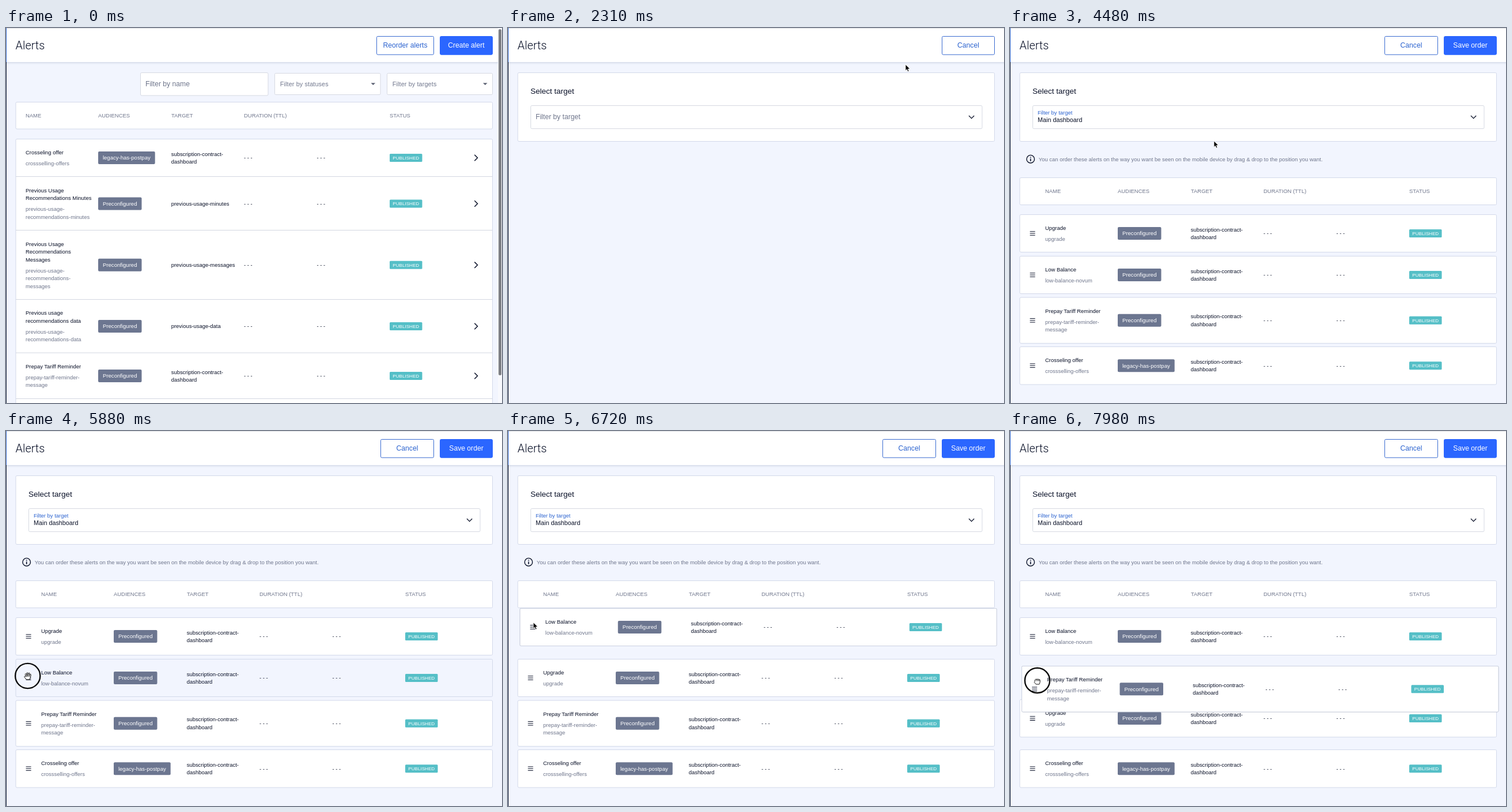
An HTML page for the animation above (8 s loop, 861 px wide and 650 px high).

```html
<!DOCTYPE html>
<html lang="en">
<head>
<meta charset="utf-8">
<title>Alerts</title>
<style>
  html, body { margin: 0; width: 100%; height: 100%; overflow: hidden; background: #f2f5fe; }
  svg { display: block; width: 861px; height: 650px; }
  text { font-family: "Liberation Sans", Arial, sans-serif; font-size: 9.45px; fill: #0a1128; }
  .title { font-family: Roboto, sans-serif; font-weight: 300; font-size: 19.8px; }
  .grey { fill: #6f768c; }
  .white { fill: #fff; }
  .blue { fill: #2a62cf; }
  .t8 { font-size: 8.1px; }
  .tag { font-size: 9.56px; }
  .t10 { font-size: 10.8px; }
  .spaced { letter-spacing: .13px; }
  .t12 { font-size: 12.15px; }
  .t13 { font-size: 13.5px; }
  .mid { text-anchor: middle; }
  .card { fill: #fff; stroke: #d3d9ea; }
  .field { fill: #fff; stroke: #d6d9e2; }
  .line { fill: none; stroke: #0a1128; stroke-width: 1.3; }
  .lifted .card { stroke: #cbd1e0; filter: drop-shadow(0 .5px .7px #0003); }
  .hover .card { fill: #f2f5fe; }
  #panel { transform-origin: 39px 175px; }
  #panel .sheet { fill: #fff; filter: drop-shadow(0 2px 2.2px #0007); }
  #cursor path { stroke-linejoin: round; stroke-linecap: round; }
</style>
</head>
<body>
<svg id="stage" viewBox="0 0 861 650"></svg>
<script>
const LOOP = 8000, STEP = 70, LINE = 13.5;

// Drawing helpers; y is the vertical middle of the capitals
const text = (x, y, s, cls = '', shift = 3.3) =>
  `<text x="${x}" y="${y + shift}" class="${cls}">${s}</text>`;
const box = (x, y, w, h, cls, r = 2) =>
  `<rect x="${x}" y="${y}" width="${w}" height="${h}" rx="${r}" class="${cls}"/>`;
const fill = (x, y, w, h, color, r = 0) =>
  `<rect x="${x}" y="${y}" width="${w}" height="${h}" rx="${r}" fill="${color}"/>`;
const path = (d, cls = 'line', extra = '') => `<path d="${d}" class="${cls}" ${extra}/>`;
const group = (id, body, attrs = '') => `<g id="${id}" ${attrs}>${body}</g>`;

const button = (x, w, label, solid) =>
  `<rect x="${x}" y="14.5" width="${w}" height="31.7" rx="2" fill="${solid ? '#2b66ff' : '#fff'}" stroke="${solid ? '#2b66ff' : '#3a6bd0'}"/>` +
  text(x + w / 2, 29.5, label, 't12 mid ' + (solid ? 'white' : 'blue'), 4);

const columns = (dx, y) =>
  [[34, 'NAME'], [160, 'AUDIENCES'], [287, 'TARGET'], [413, 'DURATION (TTL)'], [666, 'STATUS']]
    .map(([x, s]) => text(x + dx, y, s, 'grey')).join('');

const lines = (x, y, list, cls) =>
  list.map((s, i) => text(x, y + i * LINE, s, cls)).join('');

function rowContent(item, dx, cy) {
  const name = item.name.split('|'), slug = item.slug.split('|'), target = item.target.split('|');
  const top = cy - (LINE * (name.length + slug.length) + 5.3) / 2 + LINE / 2;
  const tagWidth = item.tag === 'Preconfigured' ? 75.5 : 98.7;
  return lines(34 + dx, top, name) +
    lines(34 + dx, top + name.length * LINE + 5.3, slug, 'grey') +
    fill(160 + dx, cy - 11, tagWidth, 22, '#6c7690', 2) +
    text(160 + dx + tagWidth / 2, cy, item.tag, 'tag white mid') +
    lines(286.7 + dx, cy - (target.length - 1) * LINE / 2, target) +
    text(413 + dx, cy, '- - -') + text(539.5 + dx, cy, '- - -') +
    fill(666 + dx, cy - 7, 56.5, 14, '#55bfc7', 1.5) +
    text(694.2 + dx, cy, 'PUBLISHED', 't8 white mid', 2.9);
}

const alertItem = (name, slug, target = 'subscription-contract-|dashboard', tag = 'Preconfigured') =>
  ({ name, slug, target, tag });
const cross = alertItem('Crosseling offer', 'crossselling-offers', undefined, 'legacy-has-postpay');
const prepay = alertItem('Prepay Tariff Reminder', 'prepay-tariff-reminder-|message');
const upgrade = alertItem('Upgrade', 'upgrade');
const balance = alertItem('Low Balance', 'low-balance-novum');

const listRows = [
  [225, cross],
  [304.5, alertItem('Previous Usage|Recommendations Minutes', 'previous-usage-|recommendations-minutes', 'previous-usage-minutes')],
  [410.8, alertItem('Previous Usage|Recommendations|Messages', 'previous-usage-|recommendations-|messages', 'previous-usage-messages')],
  [517, alertItem('Previous usage|recommendations data', 'previous-usage-|recommendations-data', 'previous-usage-data')],
  [603, prepay],
];

const filterSelect = (x, w, label) =>
  box(x, 78.5, w, 37, 'field') + text(x + 9.3, 96.8, label, 't10 grey spaced', 3.7) +
  path(`M${x + w - 16.5} 95.2h7.6l-3.8 3.9z`, '', 'fill="#5c6273"');

const listPage =
  button(643.5, 99, 'Reorder alerts') + button(753.5, 91, 'Create alert', true) +
  box(233.5, 77.5, 221.5, 39.5, 'field') + text(242, 97, 'Filter by name', 't12 grey', 4.2) +
  filterSelect(466.5, 183.5, 'Filter by statuses') + filterSelect(661.5, 183, 'Filter by targets') +
  box(17, 128.5, 827.5, 46.5, 'card') + columns(0, 152) +
  box(17, 192.5, 827.5, 480, 'card') +
  [257.5, 350.5, 470.5, 563, 642.5].map(y => path(`M17 ${y}H844.5`, '', 'stroke="#d3d7e1"')).join('') +
  listRows.map(([cy, item]) => rowContent(item, 0, cy) +
    path(`M813.3 ${cy - 5.2}l5.2 5.2l-5.2 5.2`, 'line', 'style="stroke-width:1.5"')).join('') +
  fill(854, 0, 7, 650, '#f8f9fd') + fill(855, 2, 5, 600, '#7d7f84', 2.5);

const pickPage =
  box(17, 77.5, 827.5, 119, 'card') + text(39, 109, 'Select target', 't13', 4.7) +
  box(39.5, 134.5, 783.5, 40, 'field') + path('M800 152l4.6 4.6l4.6 -4.6') +
  '<text id="label" x="48">Filter by target</text>' +
  group('value', text(48, 158.8, 'Main dashboard', 't10', 3.8));

const panel = box(39, 175, 784.5, 140.3, 'sheet', 1) +
  group('option', fill(39, 179.3, 784.5, 32.4, '#f3f3f5')) +
  ['Main dashboard', 'Previous usage messages', 'Previous usage page for data', 'Previous usage page for minutes']
    .map((s, i) => text(50, 195.7 + i * 32.4, s, 't12', 4.2)).join('');

const orderRows = [
  { id: 'upgrade', item: upgrade, y: 323.5, h: 65 },
  { id: 'balance', item: balance, y: 395.5, h: 65 },
  { id: 'prepay', item: prepay, y: 467, h: 79.5 },
  { id: 'cross', item: cross, y: 552.5, h: 65.5 },
];
const orderRow = ({ id, item, y, h }) => {
  const cy = y + h / 2;
  return group(id, box(17, y, 827.5, h, 'card') +
    path([-3.3, 0, 3.3].map(d => `M34.6 ${cy + d}h9`).join(''), 'line', 'style="stroke-width:1.1"') +
    rowContent(item, 27, cy));
};

const orderPage =
  button(650.5, 92, 'Cancel') + button(753.5, 91, 'Save order', true) +
  '<circle cx="35.7" cy="227.2" r="6.8" class="line" style="stroke-width:1.4"/>' +
  path('M35.7 226.3v4.6M35.7 223.2v1.6', 'line', 'style="stroke-width:1.6"') +
  text(49.8, 228, 'You can order these alerts on the way you want be seen on the mobile device by drag &amp; drop to the position you want.', 'grey') +
  box(17, 259.5, 827.5, 47, 'card') + columns(27, 283) +
  group('rows', orderRows.map(orderRow).join(''));

const ink = 'fill="#fff" stroke="#111" stroke-width="1"';
const cursor =
  group('arrow', path('M0 0V10.4L2.4 8.2L4.1 12L6 11.2L4.4 7.5H7.6Z', '', 'fill="#000" stroke="#fff" stroke-width=".8"')) +
  group('pointer', path('M-2.6 2V-4.4Q-1.4 -6.4 -.3 -4.4V-.6Q1 -1.6 2 -.3Q3.2 -1 4 .2Q5.6 -.3 5.8 1.4V4.4L4.4 8H-2.2L-5.8 3Q-5.8 1 -4 1.4Z', '', ink)) +
  group('grab', path('M-3 1L-4.4 -3Q-3.6 -5 -2.4 -3.4L-1.4 -1L-1.7 -5Q-.6 -6.6 .2 -5L.6 -1.2L1.6 -5Q2.9 -6 3.2 -4.4L2.9 -.8L4.2 -3Q5.8 -3.6 5.5 -1.8L4.4 3L3.4 6.4H-2.2L-5.8 2Q-5.8 -.2 -4.4 .3ZM-1.4 -1V1M.6 -1.2V1M2.9 -.8V1', '', ink)) +
  group('fist', path('M-4.4 1.6L-3.8 -1.4Q-2.6 -3 -1.5 -1.8Q-.2 -3.2 1 -1.9Q2.3 -3 3.2 -1.5Q5 -1.9 5 .2L4.4 4L3.4 6.6H-2.2L-5 3.4ZM-1.4 -1.6V.6M1 -1.7V.6M3.1 -1.3V.6', '', ink));

const stage = document.getElementById('stage');
stage.innerHTML =
  fill(0, 0, 861, 650, '#f2f5fe') +
  fill(0, 59, 861, 4, '#ebeff9') + fill(0, 59, 861, 2, '#dce1ee') + fill(0, 0, 861, 59, '#fff') +
  fill(0, 0, 861, 1, '#dfe0e4') +
  text(16.6, 30, 'Alerts', 'title', 7) +
  group('list', listPage) +
  group('pick', group('pickButton', button(753.5, 91, 'Cancel')) + pickPage) +
  group('order', orderPage) + group('panel', panel) +
  fill(0, 0, 1, 59, '#3b6fd4') + fill(0, 59, 1, 591, '#1c2740') +
  group('cursor', cursor) +
  '<circle id="ring" r="21.6" fill="none" stroke="#0b0b0b" stroke-width="2.4"/>';

const el = Object.fromEntries([...stage.querySelectorAll('[id]')].map(e => [e.id, e]));
const show = (e, on) => { e.style.display = on ? '' : 'none'; };
const between = (t, a, b) => t >= a && t < b;
const progress = (t, a, b) => Math.min(1, Math.max(0, (t - a) / (b - a)));
const smooth = p => p * p * (3 - 2 * p);
const easeOut = p => 1 - (1 - p) ** 3;
const mix = (a, b, p) => a + (b - a) * p;

// time, x, y
const track = [
  [70, 468, 640], [840, 698, 33], [2100, 698, 31], [2310, 690, 63.5], [2870, 805, 157],
  [3430, 805, 157], [3780, 516, 200], [4060, 354, 196], [4480, 354, 196], [4970, 163, 441],
  [5180, 163, 441], [5670, 37.7, 424.5], [5880, 37.7, 424.5], [6440, 42, 336], [6650, 42, 336],
  [6720, 44, 332], [7210, 51, 504], [7350, 51, 504], [7490, 45, 508], [7630, 45, 508], [7980, 47.4, 432.4],
];
function cursorAt(t) {
  const i = Math.max(1, track.findIndex(k => k[0] >= t));
  const [t0, x0, y0] = track[i - 1], [t1, x1, y1] = track[i];
  const p = smooth(progress(t, t0, t1));
  return [mix(x0, x1, p), mix(y0, y1, p)];
}

const shapeSpans = [
  ['pointer', 770, 1400], ['pointer', 3640, 4480], ['grab', 5600, 5950],
  ['fist', 5950, 6720], ['grab', 7490, 7700], ['fist', 7700, LOOP],
];
const clicks = [[1120, 1330], [3010, 3220], [4270, 4410], [5810, 6440], [7630, LOOP]];

function rowOffsets(t) {
  const drag = smooth(progress(t, 5880, 6440)), drop = easeOut(progress(t, 6720, 6960));
  const pull = smooth(progress(t, 7630, 7980));
  return {
    upgrade: [0, 72 * easeOut(progress(t, 6130, 6340)) + 86 * easeOut(progress(t, 7894, 8094))],
    balance: [3.8 * drag * (1 - drop), mix(-88 * drag, -72, drop)],
    prepay: [3.5 * pull, -59.5 * pull],
    cross: [0, 0],
  };
}

function draw(t) {
  const [x, y] = cursorAt(t);
  show(el.list, t < 1400);
  show(el.pick, t >= 1400);
  show(el.pickButton, t < 4480);
  show(el.order, t >= 4480);

  const open = easeOut(progress(t, 3080, 3290));
  el.label.setAttribute('y', mix(158, 149.8, open));
  el.label.style.fontSize = mix(12.15, 9.45, open) + 'px';
  el.label.style.fill = open ? '#2a62cf' : '#6f768c';
  show(el.value, t >= 4410);

  show(el.panel, between(t, 3150, 4480));
  el.panel.style.opacity = open * (1 - progress(t, 4340, 4480));
  el.panel.style.transform = `scaleY(${mix(.8, 1, open)})`;
  show(el.option, y > 179 && t > 3500);

  const offsets = rowOffsets(t);
  const lifted = between(t, 5950, 6960) ? 'balance' : t >= 7700 ? 'prepay' : '';
  for (const { id, y: top, h } of orderRows) {
    const [dx, dy] = offsets[id];
    const over = !lifted && y > top + dy && y < top + dy + h;
    el[id].setAttribute('transform', `translate(${dx} ${dy})`);
    el[id].setAttribute('class', id === lifted ? 'lifted' : over ? 'hover' : '');
  }
  if (lifted && el.rows.lastChild !== el[lifted]) el.rows.append(el[lifted]);

  const span = shapeSpans.find(([, a, b]) => between(t, a, b));
  const shape = span ? span[0] : 'arrow';
  for (const s of ['arrow', 'pointer', 'grab', 'fist']) show(el[s], s === shape);
  show(el.cursor, t >= 70);
  el.cursor.setAttribute('transform', `translate(${x} ${y})`);
  show(el.ring, clicks.some(([a, b]) => between(t, a, b)));
  el.ring.setAttribute('transform', `translate(${x} ${y})`);
}

const start = performance.now();
function tick() {
  const t = (performance.now() - start) % LOOP;
  draw(t - t % STEP);
  requestAnimationFrame(tick);
}
tick();
</script>
</body>
</html>
```
